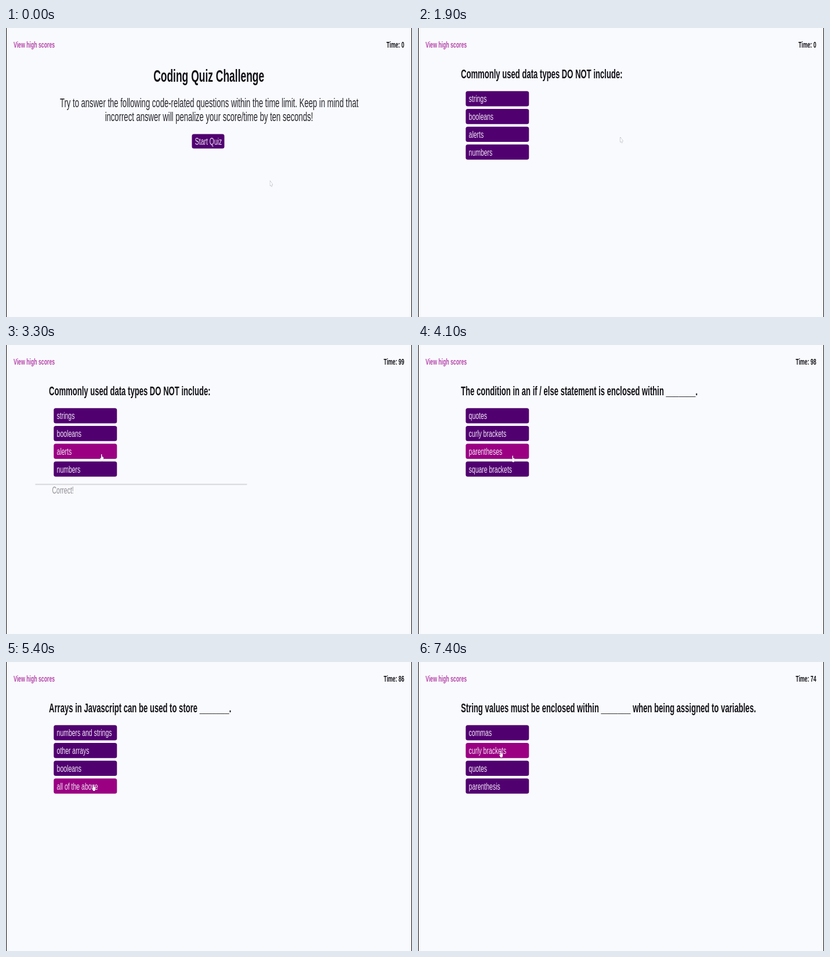
Animation of 700 by 500 pixels, one loop 8000 ms. Source, as an HTML page with a canvas:

```html
<!DOCTYPE html>
<html lang="en">
<head>
<meta charset="utf-8">
<title>Coding Quiz Challenge</title>
<style>
  html, body { margin: 0; width: 100%; height: 100%; overflow: hidden; background: #f9fafe; }
  canvas { display: block; }
</style>
</head>
<body>
<canvas id="stage" width="700" height="500"></canvas>
<script>
const ctx = document.getElementById('stage').getContext('2d');
const LOOP = 8000, STEP = 100;
const QUIZ_START = 1400, TICK = 1000;

// The page is shown squeezed: one scale for all its text.
const PAGE_X = 0.5455, PAGE_Y = 0.9;
const FONT = '"Liberation Sans", Arial, sans-serif';
const COLORS = {
  page: '#f9fafe', ink: '#111115', body: '#25252a', link: '#b545a8',
  button: '#510070', hover: '#9b0083', press: '#8f007c',
  label: '#f1e9f5', muted: '#8d8d92', rule: '#dcdce0'
};

const questions = [
  { from: 1400, text: 'Commonly used data types DO NOT include:',
    answers: ['strings', 'booleans', 'alerts', 'numbers'], clicked: 3300, feedback: 'Correct!' },
  { from: 3400, text: 'The condition in an if / else statement is enclosed within _______.',
    answers: ['quotes', 'curly brackets', 'parentheses', 'square brackets'], clicked: 5000, feedback: 'Wrong!' },
  { from: 5400, text: 'Arrays in Javascript can be used to store _______.',
    answers: ['numbers and strings', 'other arrays', 'booleans', 'all of the above'], clicked: 7100, feedback: 'Wrong!' },
  { from: 7400, text: 'String values must be enclosed within _______ when being assigned to variables.',
    answers: ['commas', 'curly brackets', 'quotes', 'parenthesis'], clicked: Infinity }
];

const moves = [
  { from: 300, to: 600, start: [455, 264], end: [348.5, 188.5] },
  { from: 1900, to: 2600, start: [348.5, 188.5], end: [164, 189] },
  { from: 4000, to: 4500, start: [164, 189], end: [150, 212] },
  { from: 5900, to: 6400, start: [150, 212], end: [142, 154] }
];

function pointerAt(t) {
  const move = moves.filter(m => t >= m.from).pop() || moves[0];
  const p = Math.min(1, Math.max(0, (t - move.from) / (move.to - move.from)));
  const eased = p * p * (3 - 2 * p);
  return move.start.map((a, i) => a + (move.end[i] - a) * eased);
}

function text(str, x, y, size, { weight = 400, color = COLORS.ink, align = 'left' } = {}) {
  ctx.save();
  ctx.translate(x, y);
  ctx.scale(PAGE_X, PAGE_Y);
  ctx.font = `${weight} ${size}px ${FONT}`;
  ctx.textAlign = align;
  ctx.fillStyle = color;
  ctx.fillText(str, 0, 0);
  ctx.restore();
}

// Draws a button and tells whether the pointer is on it.
function button(label, x, y, w, h, pointer, hoverColor = COLORS.hover) {
  const [px, py] = pointer;
  const over = px >= x && px <= x + w && py >= y && py <= y + h;
  ctx.fillStyle = over ? hoverColor : COLORS.button;
  ctx.beginPath();
  ctx.roundRect(x, y, w, h, 3.5);
  ctx.fill();
  text(label, x + 5.3, y + h / 2 + 5.8, 19.2, { color: COLORS.label });
  return over;
}

function drawHeader(t) {
  text('View high scores', 13, 33.5, 16, { weight: 700, color: COLORS.link });
  const ticks = Math.max(0, Math.floor((t - QUIZ_START) / TICK));
  const penalties = questions.filter(q => q.feedback === 'Wrong!' && t > q.clicked + 250).length;
  const time = ticks ? 100 - ticks - 10 * penalties : 0;
  text('Time: ' + time, 686.5, 33.5, 16, { weight: 700, align: 'right' });
}

function drawIntro(t, pointer) {
  text('Coding Quiz Challenge', 349.7, 93.3, 32, { weight: 700, align: 'center' });
  const style = { color: COLORS.body, align: 'center' };
  text('Try to answer the following code-related questions within the time limit. Keep in mind that', 350.3, 137, 24, style);
  text('incorrect answer will penalize your score/time by ten seconds!', 350, 161.3, 24, style);
  return button('Start Quiz', 320.5, 183.5, 56, 25, pointer, t >= 1200 ? COLORS.press : COLORS.hover);
}

function drawQuestion(question, t, pointer) {
  text(question.text, 74, 86.8, 24, { weight: 700 });
  let over = false;
  question.answers.forEach((answer, i) => {
    over = button(answer, 82.3, 109.2 + i * 30.8, 109, 26.2, pointer) || over;
  });
  if (t >= question.clicked) {
    ctx.fillStyle = COLORS.rule;
    ctx.fillRect(50.5, 240, 365, 2.3);
    text(question.feedback, 79.5, 256.8, 19.2, { color: COLORS.muted });
  }
  return over;
}

function polygon(points) {
  ctx.beginPath();
  points.forEach(([x, y]) => ctx.lineTo(x, y));
  ctx.closePath();
}

function drawPointer([x, y], hand) {
  ctx.save();
  ctx.translate(x, y);
  ctx.lineJoin = 'round';
  ctx.fillStyle = '#fff';
  if (hand) {
    polygon([[0, 0], [1.3, 0], [1.6, 4], [4, 5], [4.2, 8], [3.2, 11], [0.4, 11], [-1.8, 7], [-1.4, 6], [0, 7]]);
    ctx.strokeStyle = 'rgba(70, 20, 80, 0.45)';
  } else {
    polygon([[0.4, 0.5], [0.4, 8.8], [1.7, 7.6], [2.7, 10.4], [3.8, 9.9], [3, 7.2], [4.9, 7]]);
    ctx.strokeStyle = '#85858c';
  }
  ctx.lineWidth = 0.7;
  ctx.stroke();
  ctx.fill();
  ctx.restore();
}

function draw(now) {
  const t = Math.floor((now % LOOP) / STEP) * STEP;
  const pointer = pointerAt(t);
  const question = questions.filter(q => t >= q.from).pop();

  ctx.fillStyle = COLORS.page;
  ctx.fillRect(0, 0, 700, 500);
  drawHeader(t);
  const over = question ? drawQuestion(question, t, pointer) : drawIntro(t, pointer);
  drawPointer(pointer, over);

  ctx.fillStyle = '#0a0a0c';
  ctx.fillRect(0, 0, 1, 500);
  ctx.fillRect(699, 0, 1, 500);
}

const began = performance.now();
function frame() {
  draw(performance.now() - began);
  requestAnimationFrame(frame);
}
frame();
</script>
</body>
</html>
```
